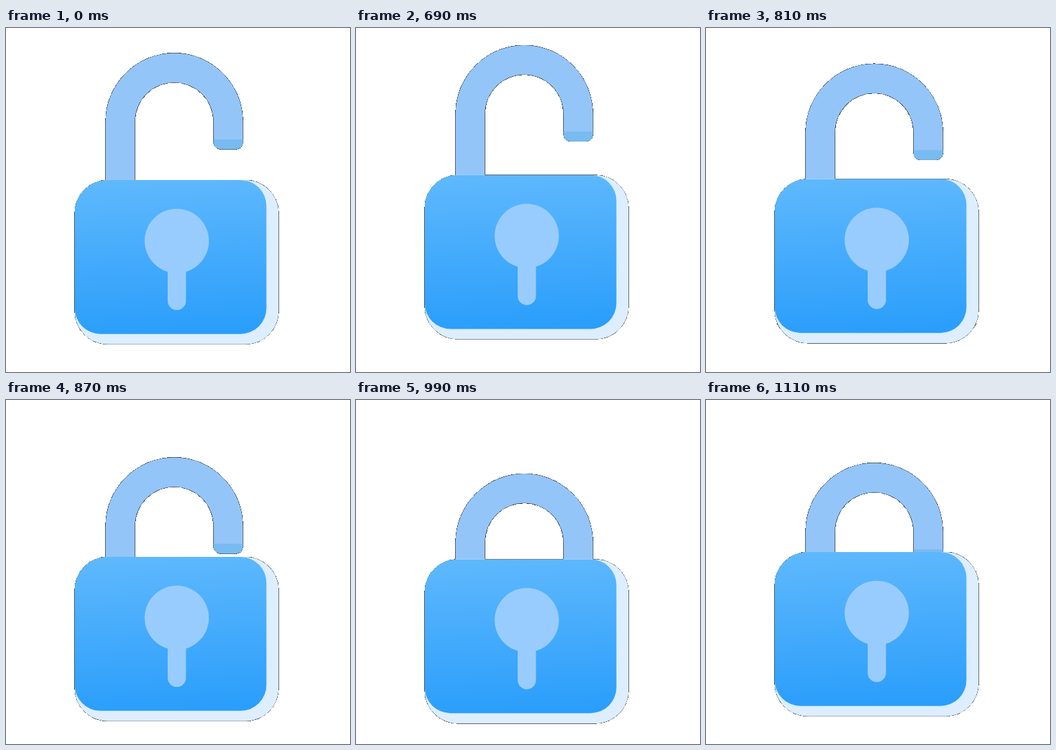
Animation of 500 by 500 pixels, one loop 1830 ms. Source, as an HTML page:

```html
<!DOCTYPE html>
<html lang="en">
<head>
<meta charset="utf-8">
<title>Padlock closing</title>
<style>
  html, body { margin: 0; width: 100%; height: 100%; overflow: hidden; background: #fff; }
  svg { display: block; width: 100%; height: 100%; }
  .edge { fill: #000; stroke: #000; stroke-width: .8; shape-rendering: crispEdges; }
</style>
</head>
<body>
<svg viewBox="0 0 500 500">
  <defs>
    <path id="bow" d="M144.7 260V136.3a99.85 99.85 0 0 1 199.7 0V166.3a10 10 0 0 1 -10 10H311.7a10 10 0 0 1 -10 -10V136.3a57.2 57.2 0 0 0 -114.4 0V260Z"/>
    <rect id="case" x="99.8" y="221" width="296.5" height="238.7" rx="48"/>
    <clipPath id="inBow"><use href="#bow"/></clipPath>
    <clipPath id="inCase"><use href="#case"/></clipPath>
    <linearGradient id="blue" x1=".47" y1="0" x2=".53" y2="1">
      <stop offset="0" stop-color="#5eb8fd"/>
      <stop offset="1" stop-color="#2a9efb"/>
    </linearGradient>
  </defs>

  <!-- dark rim, showing only along the silhouette -->
  <g class="edge">
    <use class="bow" href="#bow"/>
    <use class="case" href="#case"/>
  </g>

  <g class="bow">
    <use href="#bow" fill="#94c5f8"/>
    <rect x="300" y="162" width="46" height="16" fill="#78bbf1" clip-path="url(#inBow)"/>
  </g>

  <g class="case">
    <use href="#case" fill="#dceeff"/>
    <g clip-path="url(#inCase)">
      <rect x="99.8" y="221" width="278.7" height="223.7" rx="37.5" fill="url(#blue)"/>
    </g>
    <g fill="#99ccfe">
      <circle cx="248.2" cy="309.5" r="46.7"/>
      <rect x="235" y="330" width="26.6" height="80" rx="13.3"/>
    </g>
  </g>
</svg>
<script>
  const LOOP = 1830, STEP = 30;
  const times = [540, 750, 930, 1110];
  const shifts = { bow: [0, -16, 78.5, 55], case: [0, -10.2, 15.7, 0] };

  function valueAt(t, values) {
    if (t <= times[0]) return values[0];
    const i = times.findIndex(k => t < k);
    if (i < 0) return values[values.length - 1];
    const p = (t - times[i - 1]) / (times[i] - times[i - 1]);
    return values[i - 1] + (values[i] - values[i - 1]) * p;
  }

  const start = performance.now();

  function draw(now) {
    const t = Math.floor(Math.max(0, now - start) % LOOP / STEP) * STEP;
    for (const name in shifts) {
      const y = valueAt(t, shifts[name]);
      document.querySelectorAll('.' + name).forEach(el =>
        el.setAttribute('transform', `translate(0 ${y})`));
    }
    requestAnimationFrame(draw);
  }
  draw(start);
</script>
</body>
</html>
```
